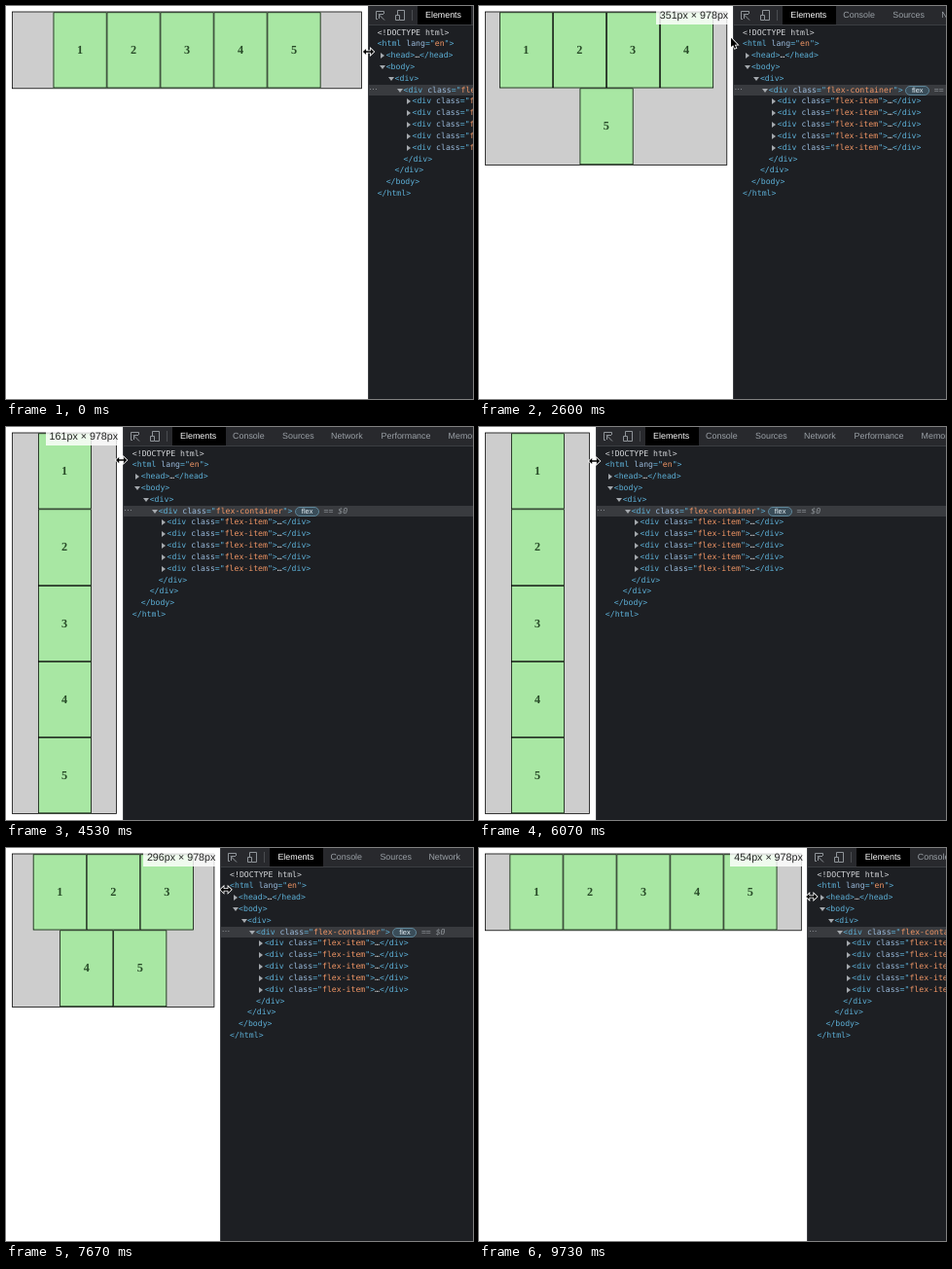
These frames come from a looping animation (480 px wide and 404 px high, 9.79 s). An HTML page:

```html
<!DOCTYPE html>
<html lang="en">
<head>
<meta charset="utf-8">
<title>Flex wrap while resizing</title>
<style>
html, body { margin: 0; width: 100%; height: 100%; overflow: hidden; background: #fff; text-rendering: geometricPrecision; }
#stage { position: relative; width: 480px; height: 404px; overflow: hidden; font: 8.9px "Liberation Sans", Arial, sans-serif; }
#stage > * { position: absolute; }
#page { left: 0; top: 0; transform-origin: 0 0; transform: translate(.3px, -.3px) scale(.743); }
#flex { position: absolute; left: 8px; top: 8px; box-sizing: border-box; border: 1px solid #000; background: #cdcdcd;
  display: flex; flex-wrap: wrap; justify-content: center; }
#flex div { box-sizing: border-box; width: 74px; height: 105.3px; border: 1px solid #000; background: #a8e7a3; color: #274a27;
  font: bold 16.5px/103px "Liberation Serif", Times, serif; text-align: center; }
#size { top: 4px; width: 76px; height: 15px; background: rgba(255,255,255,.82); color: #222;
  font-size: 10.7px; line-height: 13px; text-indent: 4px; white-space: nowrap; }
#panel { top: 0; width: 480px; height: 404px; background: #1d1f23; box-sizing: border-box; }
#panel > * { position: absolute; white-space: pre; }
#edge { left: 0; top: 0; width: 1px; height: 404px; background: #3c3e42; }
#bar { left: 0; top: 0; width: 480px; height: 19px; background: #28292d; border-bottom: 1px solid #3b3d41; }
#bar > * { position: absolute; left: 0; top: 0; line-height: 19px; color: #9aa0a6; }
#bar .on { background: #000; color: #fff; width: 55px; height: 19px; text-indent: 8.5px; }
.row { left: 1px; width: 480px; height: 11.82px; font: 8.18px/11.82px "DejaVu Sans Mono", monospace; color: #5db0d7; }
.row span { position: absolute; }
.row i { font-style: normal; color: #9bbbdc; }
.row b { font-weight: normal; color: #f29766; }
.row u { text-decoration: none; color: #d5d7da; }
.row svg { position: absolute; top: 3px; width: 6px; height: 6px; fill: #a5a9ae; }
.sel { background: #393b3f; }
.sel .dots { left: .5px; top: -3px; color: #9a9ea3; font: 9px/11.82px "Liberation Sans", Arial, sans-serif; }
.sel .badge { left: 176.5px; top: 1px; width: 23px; height: 8px; border: 1px solid #5f8699; border-radius: 5px; background: #3a4d59;
  color: #e6f0f5; font: 7.4px/8px "Liberation Sans", Arial, sans-serif; text-align: center; }
.sel .var { left: 206px; color: #8d9297; font-style: italic; }
.cursor { left: 0; top: 0; overflow: visible; width: 1px; height: 1px; stroke: #fff; stroke-width: 1.6px; paint-order: stroke; }
</style>
</head>
<body>
<div id="stage">
  <div id="page">
    <div id="flex"><div>1</div><div>2</div><div>3</div><div>4</div><div>5</div></div>
  </div>
  <div id="size"></div>
  <div id="panel">
    <div id="bar">
      <svg width="48" height="19" fill="none" stroke="#8f9499">
        <path d="M10 13.5H8.5V5.5H16.5V8M11 8.5L17 14.5M11.5 13V8.5H16"/>
        <path d="M30.5 9V4.5H37.5V14.5H33M28.5 9.5H32.5V14.5H28.5Z"/>
        <path d="M45.5 4V15" stroke="#4a4c50"/>
      </svg>
    </div>
    <div id="edge"></div>
  </div>
  <svg id="arrow" class="cursor"><path d="M0 0V9.4L2.2 7.5L3.8 11L5.3 10.3L3.8 7H6.7Z"/></svg>
  <svg id="resize" class="cursor"><path d="M-5.6 0L-2.4 -3.1V-.8H2.4V-3.1L5.6 0L2.4 3.1V.8H-2.4V3.1Z"/></svg>
</div>
<script>
const $ = id => document.getElementById(id);
const LOOP = 9790, STEP = 200 / 3, SCALE = 0.743;

// time, viewport width, pointer offset from the divider, pointer y
const KEYS = [
  [0, 500, 1, 47], [1000, 500, 1, 47], [1300, 486, 0, 44], [1933, 423, -2, 37],
  [3333, 271, -1.5, 28], [4450, 161, -1, 34], [6100, 161, -1, 35], [6450, 176, 3, 37],
  [7000, 225, 8, 40], [8400, 375, 4, 46], [9067, 413, 4, 48], [9733, 454, 4.5, 50], [LOOP, 454, 4.5, 50]
];

const TABS = [["Elements", 51], ["Console", 113.5], ["Sources", 164.5], ["Network", 214.5], ["Performance", 266], ["Memory", 335]];
for (const [name, x] of TABS) {
  const tab = document.createElement("span");
  tab.textContent = name;
  tab.style.left = x + "px";
  if (name === "Elements") tab.className = "on";
  $("bar").append(tab);
}

const open = (name, attr, value) =>
  "&lt;" + name + (attr ? ` <i>${attr}</i>="<b>${value}</b>"` : "") + "&gt;";
const close = name => `&lt;/${name}&gt;`;
const folded = (...tag) => open(...tag) + "<u>…</u>" + close(tag[0]);
const item = [4, folded("div", "class", "flex-item"), "right"];

// indent level, markup, twisty
const ROWS = [
  [0, "<u>&lt;!DOCTYPE html&gt;</u>"],
  [0, open("html", "lang", "en")],
  [1, folded("head"), "right"],
  [1, open("body"), "down"],
  [2, open("div"), "down"],
  [3, open("div", "class", "flex-container"), "down"],
  item, item, item, item, item,
  [3, close("div")], [2, close("div")], [1, close("body")], [0, close("html")]
];
const TWISTY = { right: "M1 0L5 3L1 6Z", down: "M0 1H6L3 5Z" };

ROWS.forEach(([level, html, twisty], i) => {
  const row = document.createElement("div"), x = 9.2 + level * 8.95;
  row.className = "row";
  row.style.top = 21.5 + i * 11.82 + "px";
  row.innerHTML = `<span style="left:${x}px">${html}</span>`;
  if (twisty) row.innerHTML += `<svg style="left:${x - 6.5}px"><path d="${TWISTY[twisty]}"/></svg>`;
  if (i === 5) {
    row.classList.add("sel");
    row.innerHTML += '<span class="dots">…</span><span class="badge">flex</span><span class="var">== $0</span>';
  }
  $("panel").append(row);
});

function sample(t) {
  const i = KEYS.findIndex(k => k[0] > t), a = KEYS[i - 1], b = KEYS[i];
  const f = (t - a[0]) / (b[0] - a[0]);
  return a.map((v, j) => v + (b[j] - v) * f);
}

function draw(now) {
  const t = Math.min(Math.floor((now % LOOP + 4) / STEP) * STEP, LOOP - 1);
  const [, width, dx, y] = sample(t);
  const css = Math.round(width), w = css * SCALE;
  const pointing = t > 1100 && t < 4300;

  $("flex").style.width = css - 16 + "px";
  $("panel").style.left = w + "px";
  $("size").style.left = w - 79 + "px";
  $("size").textContent = css + "px × 978px";
  $("size").style.visibility = t > 1030 && t < 5550 || t > 6130 ? "visible" : "hidden";
  for (const id of ["arrow", "resize"]) {
    $(id).style.transform = `translate(${w + dx}px, ${y}px)`;
    $(id).style.visibility = (id === "arrow") === pointing ? "visible" : "hidden";
  }
}

const start = performance.now();
function tick() {
  draw(performance.now() - start);
  requestAnimationFrame(tick);
}
tick();
</script>
</body>
</html>
```
